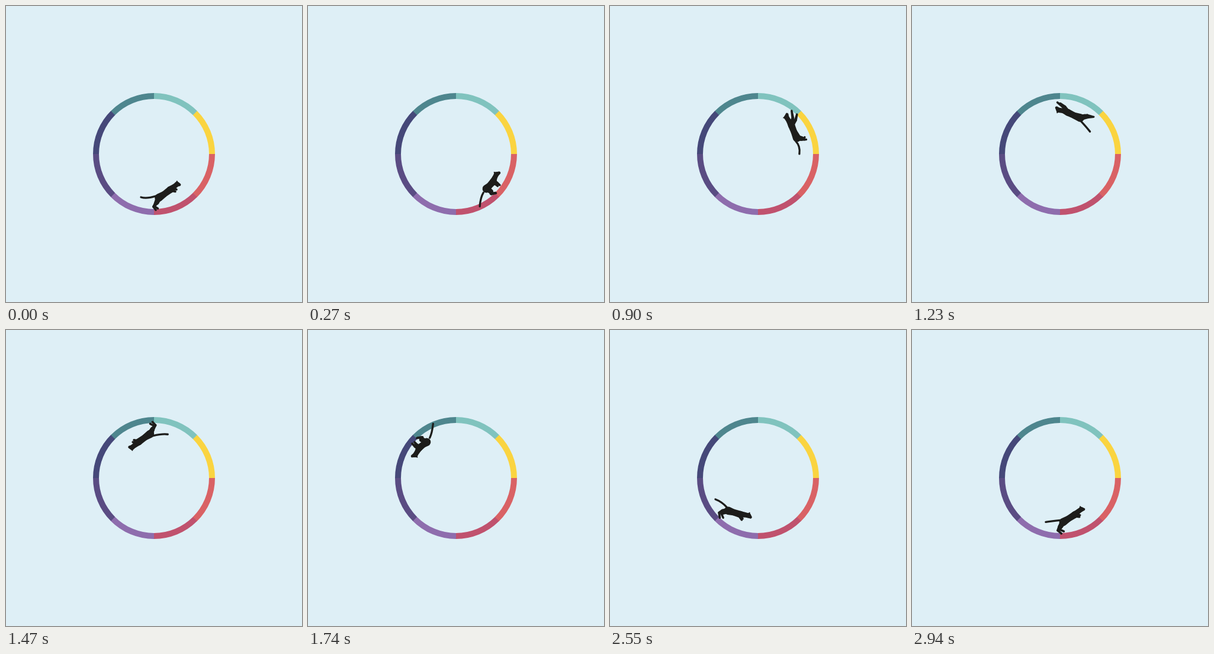
Recreate the animation shown at these times as an HTML page with a canvas. Size 500 by 500 pixels, loop 2.97 s.

```html
<!DOCTYPE html>
<html lang="en">
<head>
<meta charset="utf-8">
<title>Cat running in a ring</title>
<style>
  html, body { margin: 0; width: 100%; height: 100%; overflow: hidden; background: #deeff6; }
  canvas { display: block; width: 500px; height: 500px; }
</style>
</head>
<body>
<canvas id="stage" width="500" height="500"></canvas>
<script>
const ctx = document.getElementById('stage').getContext('2d');
const LOOP = 2970, STEP = 30, STRIDES = 8, TAU = Math.PI * 2;

// Clockwise from the right
const RING = ['#d96265', '#c0526e', '#8e6dad', '#5a4c83', '#454879', '#4e868e', '#80c3be', '#fad440'];

// Joints relative to the ring centre, with the cat at the bottom heading right
const POSES = [
  { at: 0, // push off
    spine: [[8, 74], [17, 68], [27, 60.5], [34, 55], [39, 51], [43, 52]],
    tail: [[3, 71], [-11, 74], [-22, 73]],
    hind: [[5, 82], [-1, 89], [3, 94.5]], hindFar: [[4, 82], [0, 88], [6.5, 92]],
    fore: [[32, 62], [36, 63.5]], foreFar: [[34, 59], [38, 60]] },
  { at: 0.313, // full stretch
    spine: [[2, 70], [13, 68], [25, 67], [33, 65.5], [40, 62.5], [45, 64]],
    tail: [[-1, 66], [-14, 62], [-24, 58.5]],
    hind: [[-4, 75], [-9, 77.5], [-16.5, 83]], hindFar: [[-3, 76], [-6, 80], [-14, 82]],
    fore: [[36, 71], [48.5, 72.5]], foreFar: [[34, 72.5], [43.5, 73.5]] },
  { at: 0.4545, // reach down
    spine: [[5, 71.5], [16, 70.5], [28, 70], [36, 68], [43, 66.5], [47.5, 69]],
    tail: [[-0.5, 68.5], [-10.5, 72], [-22, 69.5]],
    hind: [[3, 79], [1.5, 82], [5.5, 84.5]], hindFar: [[2, 79], [-1, 83], [0, 86]],
    fore: [[38, 76.5], [49.5, 79]], foreFar: [[33, 80], [40.5, 86]] },
  { at: 0.672, // gather
    spine: [[11, 77.5], [18, 77], [27, 76], [33, 72.5], [39, 69.5], [44.5, 70.5]],
    tail: [[3, 81], [-5, 88], [-14, 98.5]],
    hind: [[17, 85.5], [15, 89], [22, 91.5]], hindFar: [[16, 85], [13, 88], [20, 91.5]],
    fore: [[32, 82], [34, 88.5]], foreFar: [[28, 83], [29, 89]] },
  { at: 0.869, // hind legs land
    spine: [[11, 74], [19, 68.5], [29, 62], [34, 56.5], [39, 52.5], [43.5, 51.5]],
    tail: [[5, 72], [-7, 74], [-17.5, 78.5]],
    hind: [[6, 82], [4, 88], [11.5, 92.5]], hindFar: [[8, 82], [8, 86], [15, 88]],
    fore: [[33, 65], [37.5, 66]], foreFar: [[34, 64], [37, 63.5]] }
];

const SPINE_R = [6.8, 5.3, 5.8, 4.2, 4.1, 2.4];
const HIND_R = [5.2, 3.6, 1.9, 1.8];
const FORE_R = [4.6, 2.4, 1.8];

// Poses continue past either end of the stride
function key(i) {
  const n = POSES.length, lap = Math.floor(i / n), pose = POSES[i - lap * n];
  return { pose, at: pose.at + lap };
}

// Smooth periodic curve through the poses
function poseAt(phase) {
  let i = POSES.length - 1;
  while (POSES[i].at > phase) i--;
  const k = [-1, 0, 1, 2].map(d => key(i + d));
  const span = k[2].at - k[1].at, s = (phase - k[1].at) / span;
  const h = s * s * (3 - 2 * s), in1 = s * (1 - s) ** 2, in2 = s * s * (s - 1);
  const m1 = span / (k[2].at - k[0].at), m2 = span / (k[3].at - k[1].at);
  const mix = (a, b, c, d) =>
    b + (c - b) * h + (c - a) * m1 * in1 + (d - b) * m2 * in2;
  const out = {};
  for (const part of ['spine', 'tail', 'hind', 'hindFar', 'fore', 'foreFar']) {
    out[part] = k[1].pose[part].map((p, j) =>
      p.map((_, axis) => mix(...k.map(q => q.pose[part][j][axis]))));
  }
  return out;
}

// Hull of two circles
function taper(a, ra, b, rb) {
  const dx = b[0] - a[0], dy = b[1] - a[1];
  const dir = Math.atan2(dy, dx), d = Math.hypot(dx, dy) || 0.01;
  const off = Math.acos(Math.max(-1, Math.min(1, (ra - rb) / d)));
  ctx.beginPath();
  ctx.arc(a[0], a[1], ra, dir + off, dir - off + TAU);
  ctx.arc(b[0], b[1], rb, dir - off, dir + off);
  ctx.fill();
}

function limb(points, radii) {
  for (let i = 1; i < points.length; i++) {
    taper(points[i - 1], radii[i - 1], points[i], radii[i]);
  }
}

function drawRing() {
  ctx.lineWidth = 10;
  ctx.lineCap = 'butt';
  RING.forEach((color, i) => {
    ctx.strokeStyle = color;
    ctx.beginPath();
    ctx.arc(0, 0, 98, i * TAU / 8, (i + 1) * TAU / 8 + (i < 7 ? 0.005 : 0));
    ctx.stroke();
  });
}

function drawCat(pose) {
  const { spine, tail, hind, hindFar, fore, foreFar } = pose;
  const [hip, , chest, , head, nose] = spine;
  ctx.fillStyle = ctx.strokeStyle = '#1d1d1b';

  // Tail bends through its middle joint
  const [base, mid, tip] = tail;
  const bend = [0, 1].map(i => 2 * mid[i] - (base[i] + tip[i]) / 2);
  ctx.lineWidth = 3.3;
  ctx.lineCap = 'round';
  ctx.beginPath();
  ctx.moveTo(...base);
  ctx.quadraticCurveTo(...bend, ...tip);
  ctx.stroke();

  limb(spine, SPINE_R);
  limb([hip, ...hindFar], HIND_R);
  limb([hip, ...hind], HIND_R);
  limb([chest, ...foreFar], FORE_R);
  limb([chest, ...fore], FORE_R);

  const ux = nose[0] - head[0], uy = nose[1] - head[1], len = Math.hypot(ux, uy);
  const ear = [head[0] + (5 * uy - 1.5 * ux) / len, head[1] - (5 * ux + 1.5 * uy) / len];
  taper(head, 3, ear, 0.8);
}

function draw(now) {
  const time = Math.floor((now % LOOP) / STEP) * STEP;
  const turn = time / LOOP;
  ctx.setTransform(1, 0, 0, 1, 0, 0);
  ctx.fillStyle = '#deeff6';
  ctx.fillRect(0, 0, 500, 500);
  ctx.translate(250, 250);
  drawRing();
  ctx.rotate(-turn * TAU);
  drawCat(poseAt(turn * STRIDES % 1));
}

let start;
function tick(now) {
  start ??= now;
  draw(now - start);
  requestAnimationFrame(tick);
}
draw(0);
requestAnimationFrame(tick);
</script>
</body>
</html>
```
